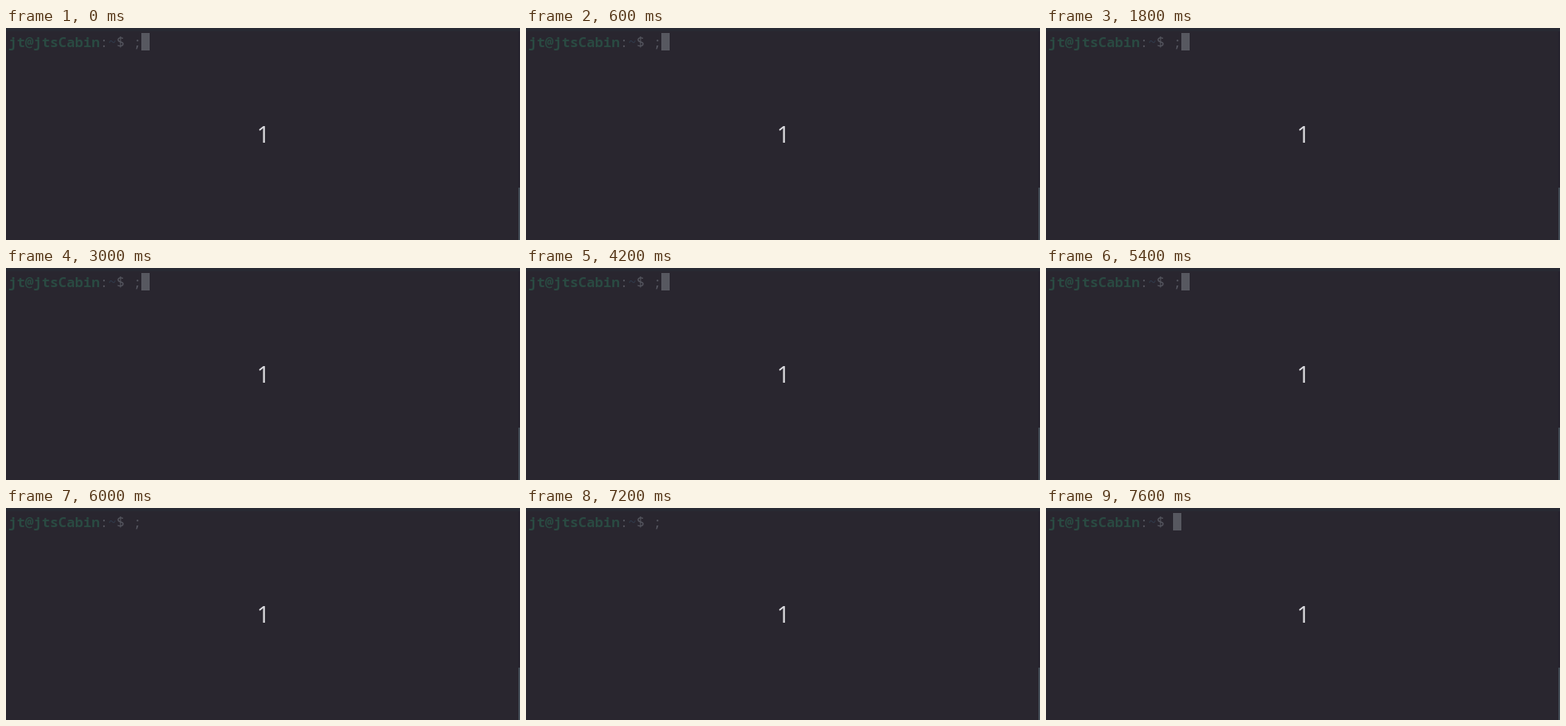
Recreate the animation shown at these times as an HTML page. Size 619 by 255 pixels, loop 8000 ms.

```html
<!DOCTYPE html>
<html lang="en">
<head>
<meta charset="utf-8">
<style>
  html, body { margin: 0; width: 100%; height: 100%; overflow: hidden; background: #29262f; }
  svg { display: block; }
  .term { font: 16.61px "DejaVu Sans Mono", monospace; font-family: "Noto Sans Mono", "DejaVu Sans Mono", monospace; font-size: 16.667px; fill: #55565f; white-space: pre; }
  .host { font-weight: 700; fill: #2a4a42; }
  .path { fill: #303b4c; }
  .count { font: 28px "Open Sans", "Noto Sans", sans-serif; fill: #dcdce0; }
</style>
</head>
<body>
<svg width="619" height="255" viewBox="0 0 619 255">
  <rect width="619" height="4" fill="#282a33"/>
  <rect x="617" y="4" width="2" height="188" fill="#25222d"/>
  <rect x="617" y="192" width="2" height="63" fill="#414a54"/>
  <g class="term">
    <text class="host" x="3" y="23">jt@jtsCabin</text>
    <text x="113" y="23">:</text>
    <text class="path" x="123" y="23">~</text>
    <text x="133" y="23">$</text>
    <text id="typed" x="153" y="23">;</text>
  </g>
  <rect id="cursor" x="163" y="6" width="10" height="21" fill="#575860"/>
  <text class="count" x="302" y="138">1</text>
</svg>
<script>
  const LOOP = 8000, BLINK = 600, KEY = 7500, ERASE = 7600;
  const typed = document.getElementById("typed");
  const cursor = document.getElementById("cursor");

  function draw(t) {
    const erased = t >= ERASE;
    // The cursor blinks until a key press makes it solid.
    const lit = t < 100 || t >= KEY || Math.floor(t / BLINK) % 2 === 1;
    typed.style.display = erased ? "none" : "";
    cursor.style.display = lit ? "" : "none";
    cursor.setAttribute("x", erased ? 153 : 163);
  }

  const start = performance.now();
  function tick() {
    draw((performance.now() - start) % LOOP);
    requestAnimationFrame(tick);
  }
  tick();
</script>
</body>
</html>
```
